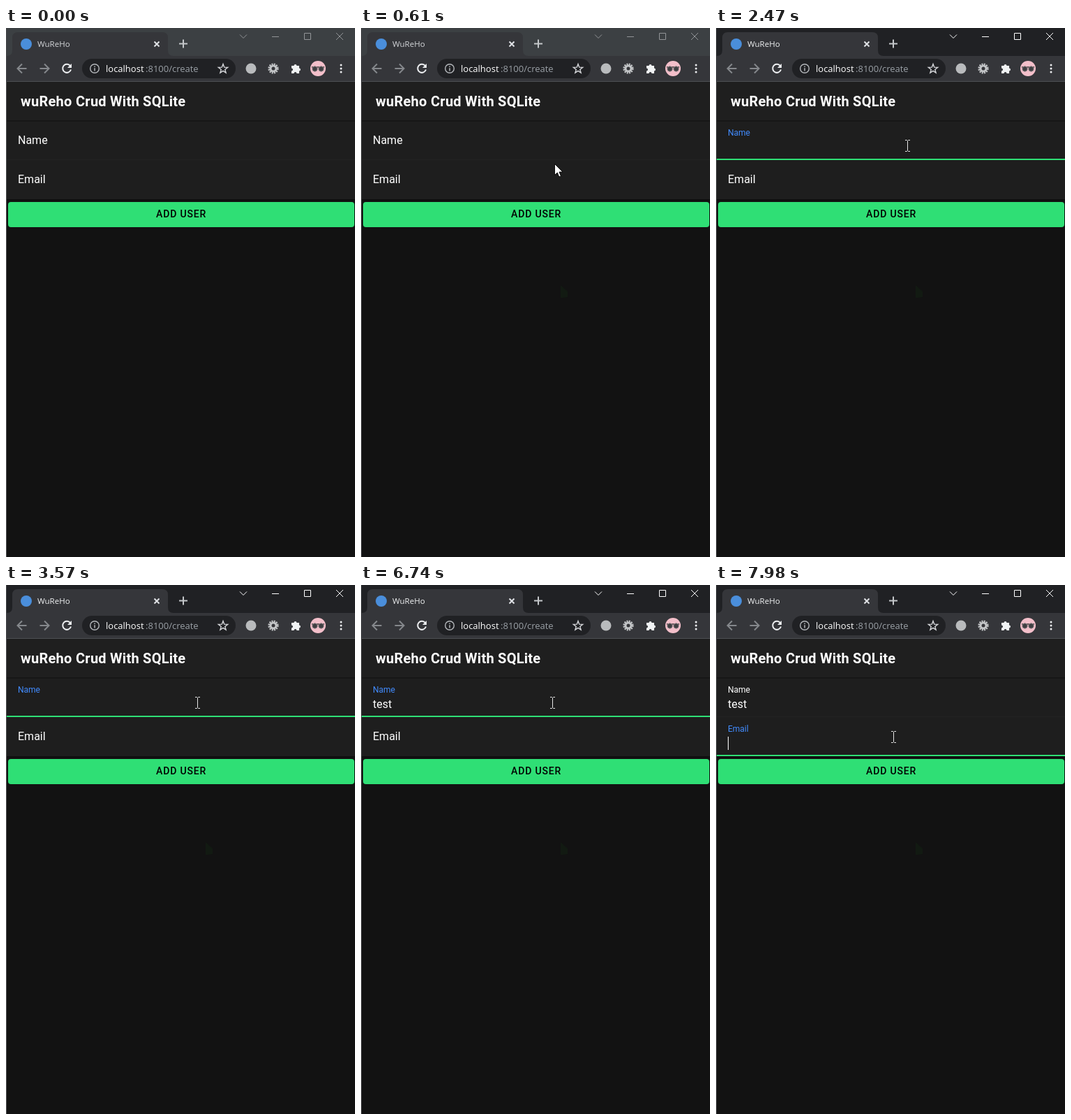
Recreate the animation shown at these times as an HTML page. Size 500 by 757 pixels, loop 8 s.

```html
<!DOCTYPE html>
<html lang="en">
<head>
<meta charset="utf-8">
<title>Create user</title>
<style>
  html, body { margin: 0; width: 100%; height: 100%; overflow: hidden; background: #121212; }
  svg { display: block; width: 500px; height: 757px; }
  text { white-space: pre; }
  .ui { font-family: "Open Sans", "Noto Sans", sans-serif; }
  .app { font: 16px Roboto, sans-serif; fill: #fff; }
  .line { fill: none; stroke-width: 2; }
  .thin { fill: none; stroke-width: 1; }
</style>
</head>
<body>
<svg viewBox="0 0 500 757" xmlns="http://www.w3.org/2000/svg">
  <!-- window frame and tab -->
  <rect id="strip" width="500" height="41"/>
  <path d="M1 40Q9 40 9 32V14Q9 6 17 6H224Q232 6 232 14V32Q232 40 240 40Z" fill="#35363a"/>
  <circle cx="29" cy="23" r="8" fill="#4a8edb"/>
  <text id="tab" class="ui" x="45" y="27" font-size="11.5">WuReHo</text>
  <path class="line" d="M212.5 19.5l7 7m0-7l-7 7" stroke="#dfe1e5" stroke-width="1.6"/>
  <path class="line" d="M248 22.5h12m-6-6v12" stroke="#c4c7ca" stroke-width="1.6"/>
  <g id="controls" class="thin">
    <path d="M335 9.5l5 5 5-5M381 12.5h10M427.5 7.5h9v9h-9zM473 7l10 10m0-10l-10 10"/>
  </g>

  <!-- address row -->
  <rect y="40" width="500" height="36" fill="#35363a"/>
  <rect y="76" width="500" height="1" fill="#4e5053"/>
  <g class="line" stroke="#85888c" stroke-width="1.8">
    <path d="M29.5 58H16.5m6.5-6.5L16.5 58l6.500 6.500"/>
    <path d="M48.500 58h13m-6.500-6.500l6.500 6.500-6.500 6.500"/>
  </g>
  <path class="line" d="M92 54.200A6 6 0 1 0 93 59.500" stroke="#eceef0"/>
  <path d="M94 51v6h-6z" fill="#eceef0"/>
  <rect x="109" y="44" width="220" height="28" rx="14" fill="#202124"/>
  <circle cx="127" cy="58" r="6.300" fill="none" stroke="#b4b7bb" stroke-width="1.400"/>
  <path d="M126.300 54.500h1.500v1.500h-1.500zm0 2.800h1.500v4.200h-1.500z" fill="#b4b7bb"/>
  <text class="ui" x="143" y="63" font-size="13" fill="#fff">localhost<tspan x="200" fill="#9aa0a6">:8100/create</tspan></text>
  <path id="star" fill="none" stroke="#d5d7da" stroke-width="1.400"/>
  <circle cx="351" cy="58" r="7.500" fill="#b9bbbd"/>
  <g fill="none" stroke="#c3c5c7">
    <circle cx="383" cy="58" r="6.300" stroke-width="2.600" stroke-dasharray="2 1.300"/>
    <circle cx="383" cy="58" r="4" stroke-width="3"/>
  </g>
  <path d="M409 54h3.500a2 2 0 1 1 4 0H420v3.500a2 2 0 1 1 0 4V65h-3.500a2 2 0 0 0-4 0H409v-3.500a2 2 0 0 0 0-4z" fill="#f1f3f4"/>
  <circle cx="447" cy="58" r="11" fill="#f3bfca"/>
  <path d="M438 56h18" stroke="#3a3436" stroke-width="1.500"/>
  <g fill="#3f3f42" stroke="#8c8084">
    <circle cx="442.500" cy="58.500" r="3.700"/><circle cx="451.500" cy="58.500" r="3.700"/>
  </g>
  <g fill="#eceef0">
    <circle cx="480" cy="53" r="1.500"/><circle cx="480" cy="58" r="1.500"/><circle cx="480" cy="63" r="1.500"/>
  </g>

  <!-- page -->
  <rect y="77" width="500" height="680" fill="#121212"/>
  <rect y="77" width="500" height="56" fill="#1f1f1f"/>
  <rect y="133" width="500" height="112" fill="#1e1e1e"/>
  <rect y="132" width="500" height="2" fill="#171717"/>
  <rect y="188" width="500" height="1" fill="#222"/>
  <rect y="245" width="500" height="2" fill="#0f0f0f"/>
  <text class="app" x="21" y="112" style="font-size:20px;font-weight:700;letter-spacing:.25px">wuReho<tspan x="100">Crud With SQLite</tspan></text>
  <text id="name" class="app">Name</text>
  <text id="email" class="app">Email</text>
  <text id="typed" class="app" x="17" y="176"></text>
  <rect id="under" x="1" width="499" height="2" fill="#2fdf75"/>
  <rect id="caret" width="1" height="19" fill="#fff"/>
  <rect id="button" x="3" y="249" width="496" height="36" rx="4"/>
  <text class="app" x="215" y="271" style="font-size:14px;font-weight:500;letter-spacing:.84px;fill:#000">ADD USER</text>
  <path id="trace" d="M286 368v18h4l6-1v-8z" fill="#121a12"/>
  <rect y="77" width="1" height="680" fill="#555658"/>
  <rect width="1" height="77" fill="#47494c"/>

  <!-- pointer -->
  <circle id="click" r="12" fill="#8d8510"/>
  <g id="arrow">
    <path d="M.5.5V16.500L4.300 13l2.500 6 2.600-1.100L7 12h5z" fill="#fff" stroke="#000" stroke-width=".9"/>
  </g>
  <g id="hand">
    <path d="M4 1.500q1.500-2 3 0V8l7 1.500q2 .5 1.500 3L14 20H6L0 12q1-2 4 1z" fill="#fff" stroke="#000"/>
  </g>
  <g id="beam">
    <path d="M-3 -7.500h2.500l1 1 1-1H4M.5-6.500v14M-3 8.500h2.500l1-1 1 1H4" class="thin" stroke="#e6e6e6"/>
  </g>
</svg>
<script>
const LOOP = 8000;
const el = id => document.getElementById(id);
const set = (id, attrs) => {
  for (const key in attrs) el(id).setAttribute(key, attrs[key]);
};
const show = (id, on) => set(id, { visibility: on ? "visible" : "hidden" });

// Each step changes only the listed parts of the state.
const start = {
  ptr: "", x: 0, y: 0, click: false, hover: false, active: false, trace: false,
  field: "", caret: false, text: "", name: 0, nameHue: 0, email: 0
};
const steps = [
  [150, { ptr: "arrow", x: 293, y: 620 }],
  [230, { x: 289, y: 490 }],
  [300, { x: 286, y: 368 }],
  [380, { ptr: "hand", x: 279, y: 262, hover: true, trace: true }],
  [530, { ptr: "arrow", x: 279, y: 224, hover: false }],
  [610, { x: 277, y: 194 }],
  [690, { ptr: "beam", x: 275, y: 174 }],
  [770, { x: 274, y: 168 }],
  [840, { click: true, active: true }],
  [920, { field: "name", caret: true, name: .2, nameHue: .3 }],
  [1000, { name: .75, nameHue: .8 }],
  [1070, { name: 1, nameHue: 1, click: false }],
  ...[1460, 1920, 2470, 3020, 3570, 4120, 4580].map((t, i) => [t, { caret: i % 2 === 1 }]),
  [4810, { text: "t", caret: true }],
  [4890, { text: "te" }],
  [5040, { text: "tes" }],
  [5190, { text: "test" }],
  ...[5740, 6200, 6740, 7290].map((t, i) => [t, { caret: i % 2 === 1 }]),
  [7430, { x: 271, y: 176 }],
  [7510, { x: 263, y: 196 }],
  [7580, { x: 257, y: 211 }],
  [7660, { x: 254, y: 217 }],
  [7830, { click: true, field: "email", caret: true, email: .2, nameHue: .7 }],
  [7900, { email: .75, nameHue: .2 }],
  [7980, { email: 1, nameHue: 0, click: false }]
];

function label(id, y, rise, hue) {
  const mix = [66, 140, 255].map(c => Math.round(255 + (c - 255) * hue));
  set(id, { transform: `translate(17 ${y - 12 * rise}) scale(${1 - rise / 4})` });
  el(id).style.fill = `rgb(${mix})`;
}

function draw(s) {
  set("strip", { fill: s.active ? "#202124" : "#3c4043" });
  set("tab", { fill: s.active ? "#f1f3f4" : "#d5d7da" });
  set("controls", { stroke: s.active ? "#fff" : "#929497" });
  set("button", { fill: s.hover ? "#44e283" : "#2fdf75" });
  show("trace", s.trace);

  label("name", 166, s.name, s.nameHue);
  label("email", 222, s.email, s.email);
  el("typed").textContent = s.text;

  const top = s.field === "email" ? 56 : 0;
  const width = s.text && !top ? el("typed").getComputedTextLength() : 0;
  set("under", { y: 187 + top });
  set("caret", { x: 17 + Math.floor(width), y: 161 + top });
  show("under", s.field);
  show("caret", s.caret);

  set("click", { cx: s.x - 2, cy: s.y - 1 });
  show("click", s.click);
  for (const kind of ["arrow", "hand", "beam"]) {
    show(kind, s.ptr === kind);
    set(kind, { transform: `translate(${s.x} ${s.y})` });
  }
}

const points = Array.from({ length: 10 }, (_, i) => {
  const r = i % 2 ? 2.9 : 7, a = i * Math.PI / 5;
  return [311 + r * Math.sin(a), 58.5 - r * Math.cos(a)];
});
set("star", { d: "M" + points.join("L") + "Z" });

let last = -1;
function tick() {
  const t = performance.now() % LOOP;
  const done = steps.filter(step => step[0] <= t);
  if (done.length !== last) {
    last = done.length;
    draw(Object.assign({}, start, ...done.map(step => step[1])));
  }
  requestAnimationFrame(tick);
}
tick();
</script>
</body>
</html>
```
